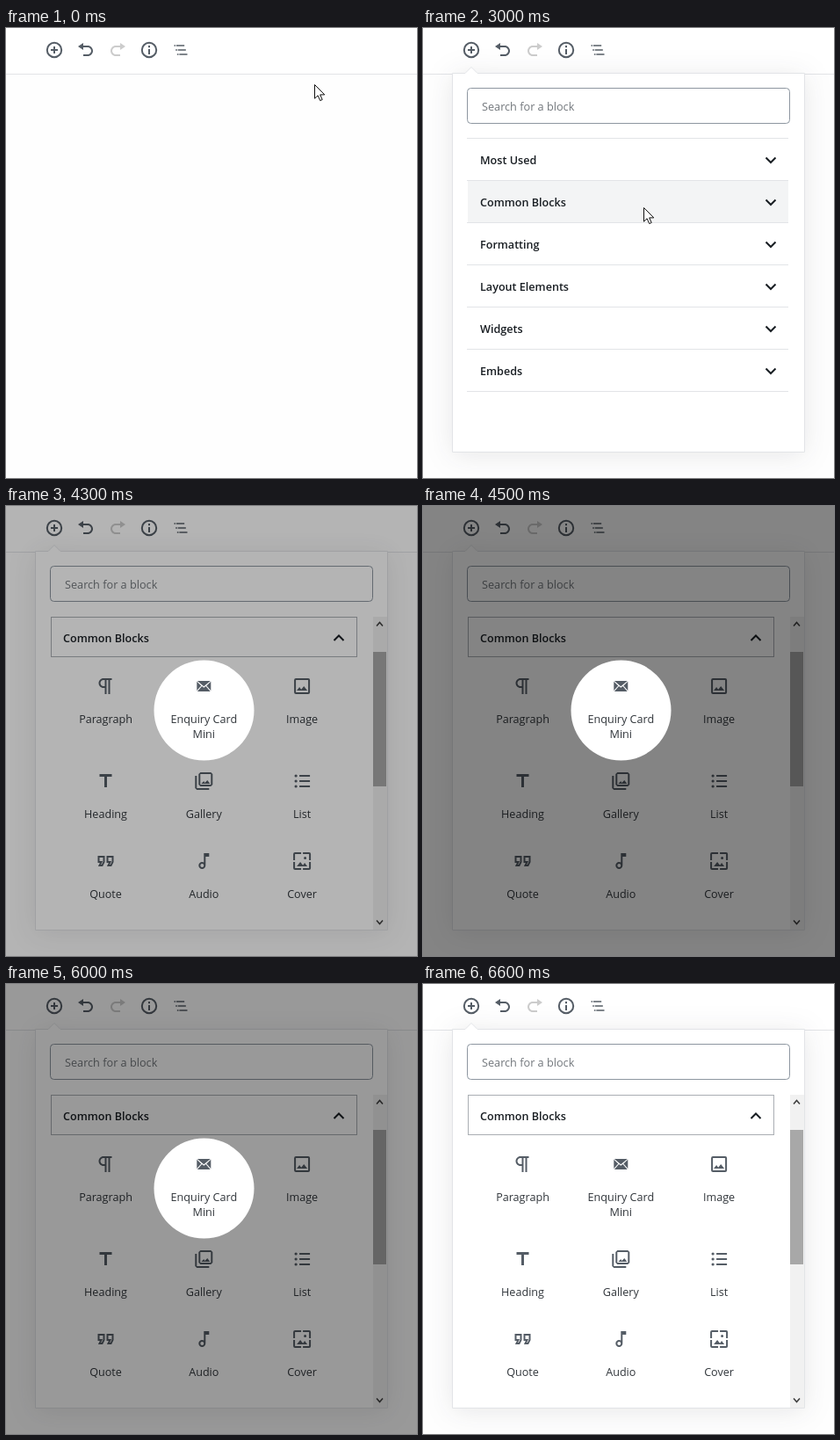
An HTML page for the animation above (7000 ms loop, 468 by 512 pixels).

```html
<!DOCTYPE html>
<html lang="en">
<head>
<meta charset="utf-8">
<title>Block inserter</title>
<style>
  html, body { margin: 0; width: 100%; height: 100%; overflow: hidden; background: #fefefe; }
  svg { display: block; width: 468px; height: 512px; }
  text { font: 12.6px "Open Sans", "Noto Sans", sans-serif; fill: #32373c; }
  .title { font-weight: 600; fill: #191e23; }
  .hint { font-size: 12.7px; fill: #72777c; }
  .mid { text-anchor: middle; }
  .icon { fill: #555d66; fill-rule: evenodd; }
  .line { fill: none; stroke: #e2e4e7; }
  .chevron { fill: none; stroke: #191e23; stroke-width: 2; }
  #panel { filter: drop-shadow(0 3px 15px rgba(25, 30, 35, .1)); }
</style>
</head>
<body>
<svg viewBox="0 0 468 512" xmlns="http://www.w3.org/2000/svg">
  <rect width="468" height="512" fill="#fefefe"/>
  <rect width="468" height="52" fill="#fff"/>
  <path class="line" d="M0 52.5H468"/>

  <rect id="hover" x="37.5" y="7.5" width="35" height="35" rx="4" fill="#fff" stroke="#e2e4e7"/>
  <circle id="ring" cx="55" cy="26" fill="none" stroke="#efb95a" stroke-width="3"/>
  <g fill="none" stroke="#555d66" stroke-width="2">
    <circle cx="55" cy="25" r="8.2"/>
    <path d="M51 25h8M55 21v8"/>
    <circle cx="163" cy="25" r="8.2"/>
    <path d="M163 24v6M163 20v2.2"/>
  </g>
  <path class="icon" transform="translate(81 15)" d="M12 5H7V2L1 6l6 4V7h5c2.2 0 4 1.8 4 4s-1.8 4-4 4H7v2h5c3.3 0 6-2.7 6-6s-2.7-6-6-6z"/>
  <path transform="translate(117 15)" fill="#ccc" d="M8 5h5V2l6 4-6 4V7H8c-2.2 0-4 1.8-4 4s1.8 4 4 4h5v2H8c-3.3 0-6-2.7-6-6s2.7-6 6-6z"/>
  <path class="icon" transform="translate(189 15) scale(.8333)" d="M3 5h2v2H3zM6 5h11v2H6zM5 11h2v2H5zM8 11h11v2H8zM7 17h2v2H7zM10 17h11v2H10z"/>

  <g id="tip">
    <path d="M16 51H49L55 45L61 51H94V78H16Z" fill="#191e23"/>
    <text class="mid" x="55" y="69" style="fill:#fff">Add block</text>
  </g>

  <g id="panel">
    <path d="M33.5 51.5H48L55 44.5L62 51.5H434.5V482.5H33.5Z" fill="#fff" stroke="#e2e4e7"/>
  </g>
  <g id="search">
    <rect x="50.5" y="68.5" width="367" height="40" rx="4" fill="#fff" stroke="#8d96a0"/>
    <text class="hint" x="67" y="94">Search for a block</text>
  </g>
  <g id="closed">
    <path class="line" d="M50 125.5H416"/>
  </g>
  <g id="open">
    <rect x="51.5" y="126.5" width="348" height="45" fill="none" stroke="#555d66" stroke-dasharray="1 1"/>
    <text class="title" x="65" y="155">Common Blocks</text>
    <path class="chevron" d="M373.5 153L379 147.5L384.5 153"/>
    <rect x="418" y="126" width="16" height="356" fill="#f1f1f1"/>
    <rect id="thumb" x="418" y="166" width="15" height="153"/>
    <path d="M422 136.5L425.5 132.5L429 136.5M422 471.5L425.5 475.5L429 471.5" fill="none" stroke="#404040" stroke-width="1.6"/>
  </g>

  <path id="shade" fill-rule="evenodd" d="M0 0H468V512H0ZM168.5 232.5a57 57 0 1 0 114 0a57 57 0 1 0 -114 0Z"/>
  <path id="cursor" d="M.5 .5V16.2L4.1 12.8L6.7 18.6L9.2 17.5L6.7 11.9H11.8Z" fill="#fff" stroke="#111"/>
</svg>
<script>
const LOOP = 7000, STEP = 100;
const $ = id => document.getElementById(id);

function add(parent, tag, attrs, label = '') {
  const el = document.createElementNS('http://www.w3.org/2000/svg', tag);
  for (const key in attrs) el.setAttribute(key, attrs[key]);
  el.textContent = label;
  parent.append(el);
  return el;
}

const rows = ['Most Used', 'Common Blocks', 'Formatting', 'Layout Elements', 'Widgets', 'Embeds'].map((name, i) => {
  const y = 126 + i * 48;
  const back = add($('closed'), 'rect', { x: 51, y, width: 365, height: 47, fill: '#fff' });
  add($('closed'), 'text', { class: 'title', x: 65, y: y + 29 }, name);
  add($('closed'), 'path', { class: 'chevron', d: `M390.5 ${y + 21.5}l5.5 5.5l5.5 -5.5` });
  add($('closed'), 'path', { class: 'line', d: `M50 ${y + 47.5}H416` });
  return back;
});

const dot = y => `M3.4 ${y}a1.6 1.6 0 1 0 3.2 0a1.6 1.6 0 1 0 -3.2 0z`;
const blocks = [
  ['Paragraph', 'M11 5v7H9.5C7.6 12 6 10.4 6 8.5S7.6 5 9.5 5H11m8-2H9.5C6.5 3 4 5.5 4 8.5S6.5 14 9.5 14H11v7h2V5h2v16h2V5h2V3z'],
  ['Enquiry Card|Mini', 'M4.5 6H19.5L12 12.2zM4 6.8L9 11.4L4 17zM20 6.8L15 11.4L20 17zM4.6 18L9.8 12.1L12 13.8L14.2 12.1L19.4 18z'],
  ['Image', 'M5 3H19a2 2 0 0 1 2 2V19a2 2 0 0 1-2 2H5a2 2 0 0 1-2-2V5a2 2 0 0 1 2-2zM5 5V19H19V5zM14.1 11.9l-3 3.9L9 13.1L6 17h12z'],
  ['Heading', 'M5 4v3h5.5v12h3V7H19V4z'],
  ['Gallery', 'M20 4v12H8V4h12m0-2H8L6 4v12l2 2h12l2-2V4l-2-2zM12 12l1 2 3-3 3 4H9zM2 6v14l2 2h14v-2H4V6H2z'],
  ['List', 'M9 5h12v2H9zM9 11h12v2H9zM9 17h12v2H9z' + dot(6) + dot(12) + dot(18)],
  ['Quote', [3, 13].map(x => `M${x} 6h8v7.2L${x + 5.6} 18h-5.2l2-4H${x}zm2 2v4h3.6l-2 4h.8L${x + 6} 12.8V8z`).join('')],
  ['Audio', 'M12 3v10.5c-.6-.3-1.3-.5-2-.5c-2.2 0-4 1.8-4 4s1.8 4 4 4s4-1.8 4-4V7h4V3zM10 19a2 2 0 1 1 0-4a2 2 0 1 1 0 4z'],
  ['Cover', 'M4 4h7V2H4a2 2 0 0 0-2 2v7h2zM20 2h-7v2h7v7h2V4a2 2 0 0 0-2-2zM20 20h-7v2h7a2 2 0 0 0 2-2v-7h-2zM4 13H2v7a2 2 0 0 0 2 2h7v-2H4zM10 13l-4 5h12l-3-4-2 2.7zM14 8.5a1.5 1.5 0 1 0 3 0a1.5 1.5 0 1 0-3 0z']
];
blocks.forEach(([name, d], i) => {
  const x = 113.5 + (i % 3) * 111.8, y = [205, 313, 404][Math.floor(i / 3)];
  add($('open'), 'path', { class: 'icon', d, transform: `translate(${x - 12} ${y - 12})` });
  name.split('|').forEach((part, n) => add($('open'), 'text', { class: 'mid', x, y: y + 42 + n * 17 }, part));
});

// time, x, y
const path = [
  [0, 351, 64], [100, 348, 66], [300, 240, 58], [500, 110, 36], [700, 57, 25],
  [1400, 57, 25], [1500, 150, 50], [1600, 345, 103], [1700, 449, 129],
  [1800, 457, 139], [1900, 456, 145], [2000, 440, 148], [2100, 405, 151],
  [2300, 345, 174], [2500, 280, 194], [2600, 268, 197],
  [2700, 268, 197], [3000, 251, 204], [3300, 251, 204], [3700, 428, 245]
];

const clamp = v => Math.max(0, Math.min(1, v));
const ease = p => p < .5 ? 2 * p * p : 1 - 2 * (1 - p) * (1 - p);
const fade = (t, from) => ease(clamp((t - from) / 1000));
const show = (id, on) => $(id).setAttribute('opacity', Number(on));

function cursorAt(t) {
  const i = path.findIndex(k => k[0] > t);
  if (i < 0) return path[path.length - 1].slice(1);
  const a = path[i - 1], b = path[i], p = (t - a[0]) / (b[0] - a[0]);
  return [1, 2].map(n => a[n] + (b[n] - a[n]) * p);
}

function draw(t) {
  const [x, y] = cursorAt(t);
  $('cursor').setAttribute('transform', `translate(${Math.round(x)} ${Math.round(y)})`);
  show('cursor', t < 3900);
  show('hover', t >= 600 && t < 1500);
  show('tip', t < 1400 ? clamp((t - 900) / 200) : 0);

  const pulse = (t - 1400) / 600;
  $('ring').setAttribute('r', 13.5 + 4 * clamp(pulse));
  show('ring', pulse >= 0 && pulse < 1 ? Math.min(.8, 1.6 * (1 - pulse)) : 0);

  show('panel', t >= 1400);
  show('search', t >= 1400);
  show('closed', t >= 1400 && t < 3300);
  show('open', t >= 3300);
  rows.forEach((row, i) => {
    const over = x > 50 && x < 416 && Math.floor((y - 126) / 48) === i;
    row.setAttribute('fill', over ? '#f3f4f5' : '#fff');
  });
  $('thumb').setAttribute('fill', t < 3700 ? '#c1c1c1' : '#a8a8a8');
  show('shade', .59 * (fade(t, 3800) - fade(t, 5600)));
}

const start = performance.now();
function tick() {
  const t = (performance.now() - start) % LOOP;
  draw(Math.floor(t / STEP) * STEP);
  requestAnimationFrame(tick);
}
draw(0);
requestAnimationFrame(tick);
</script>
</body>
</html>
```
